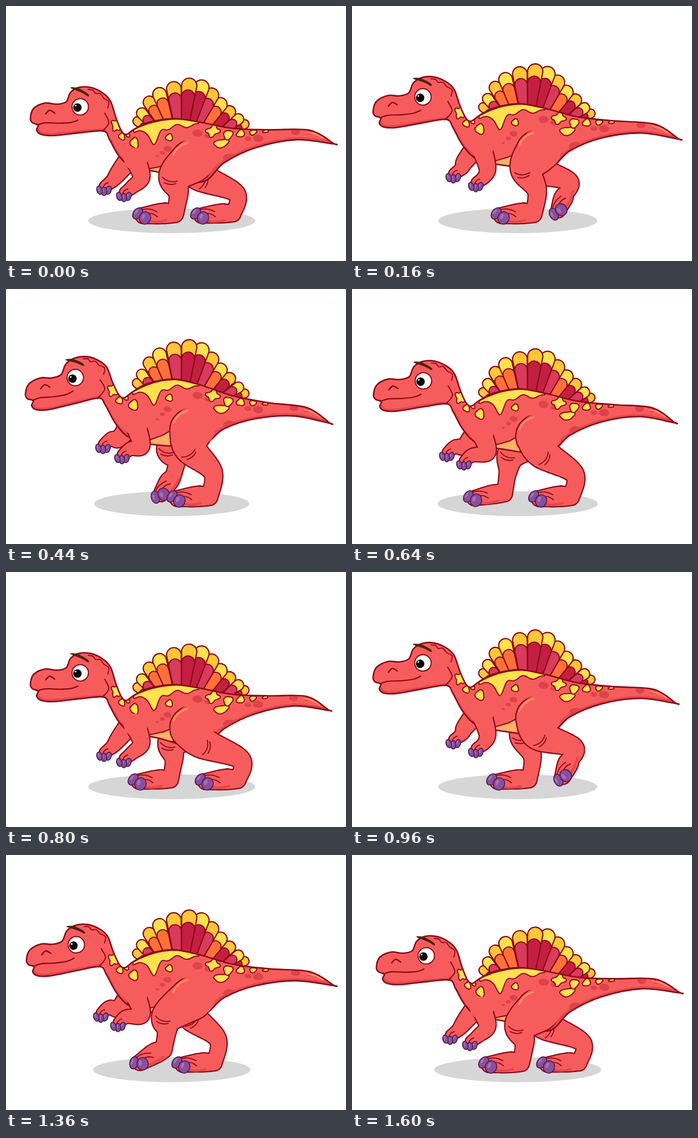
An HTML page with a canvas for the animation above (1.64 s loop, 600 by 450 pixels).

```html
<!DOCTYPE html>
<html lang="en">
<head>
<meta charset="utf-8">
<title>Walking dinosaur</title>
<style>
html, body { margin: 0; width: 100%; height: 100%; overflow: hidden; background: #fff; }
canvas { display: block; }
</style>
</head>
<body>
<canvas id="stage" width="600" height="450"></canvas>
<script>
const ctx = document.getElementById('stage').getContext('2d');
const RED = '#f75c5c', SHADE = '#e2484d', SPOT = '#dd434b', LINE = '#8a0a18', GLOW = '#ff9468';
const YELLOW = '#ffe14f', AMBER = '#ffc737', CLAW = '#8a4f9c';
const PINK = '#d83b5c', CRIMSON = '#c41f40', ORANGE = '#ff7139';
const CYCLE = 1600, HOLD = 40, TAU = Math.PI * 2;

// Side view at the top of a step; warp() bends it through the walk
const BODY = [34,186, 40,168, 60,157, 80,157, 97,151, 105,133, 120,122, 142,119, 164,126, 178,138, 188,164,
  199,186, 209,191, 224,180, 250,166, 295,158, 345,169, 400,188, 465,201, 535,211, 575,238, 575,239, 510,225,
  440,229, 385,246, 345,274, 270,275, 220,263, 194,238, 176,206, 164,192, 125,201, 75,213, 53,213, 45,206,
  48,197, 38,194];
const CREST = [[231, 165], [266, 118], [335, 103], [382, 146], [421, 184]];
const FEATHERS = [PINK, PINK, ORANGE, ORANGE, PINK, CRIMSON, CRIMSON, PINK, ORANGE, CRIMSON, PINK, CRIMSON];

let lift = 0, sink = 0, sway = 0;

const clamp = v => Math.max(0, Math.min(1, v));
const mix = (a, b, u) => a + (b - a) * u;
const bell = (x, mid, width) => Math.exp(-(((x - mid) / width) ** 2));

// Head, back and tail follow the bounce; both ends lag behind the middle
function warp(x, y) {
  const belly = x > 190 && x < 330 ? 1 - .55 * clamp((y - 215) / 60) : 1;
  const end = clamp((Math.abs(x - 280) - 60) / 120);
  const tip = clamp((x - 400) / 175) ** 2;
  return [
    x + sink * 9 * clamp((240 - x) / 80) - tip * (2 + 5 * Math.cos(sway - 2.7)),
    y + sink * (belly * (8 + 33 * bell(x, 280, 170)) - 18 * lift * end) + tip * (3 * Math.cos(sway - 1.7) - 5)
  ];
}

// Point on a Catmull-Rom curve; u counts control points
function along(pts, u) {
  const at = i => pts[Math.max(0, Math.min(pts.length - 1, i))];
  const i = Math.min(Math.floor(u), pts.length - 2), f = u - i;
  const [a, b, c, d] = [at(i - 1), at(i), at(i + 1), at(i + 2)];
  return b.map((v, k) => v + f / 2 * (c[k] - a[k]
    + f * (2 * a[k] - 5 * v + 4 * c[k] - d[k] + f * (3 * v - a[k] - 3 * c[k] + d[k]))));
}

function spline(flat, closed) {
  const pts = [];
  for (let i = 0; i < flat.length; i += 2) pts.push(warp(flat[i], flat[i + 1]));
  const n = pts.length, path = new Path2D();
  const at = i => closed ? pts[(i + n) % n] : pts[Math.max(0, Math.min(n - 1, i))];
  path.moveTo(...pts[0]);
  for (let i = 0; i < (closed ? n : n - 1); i++) {
    const [a, b, c, d] = [at(i - 1), at(i), at(i + 1), at(i + 2)];
    path.bezierCurveTo(b[0] + (c[0] - a[0]) / 6, b[1] + (c[1] - a[1]) / 6,
      c[0] - (d[0] - b[0]) / 6, c[1] - (d[1] - b[1]) / 6, c[0], c[1]);
  }
  if (closed) path.closePath();
  return path;
}

function paint(path, fill, stroke, width = 2) {
  if (fill) { ctx.fillStyle = fill; ctx.fill(path); }
  if (stroke) { ctx.strokeStyle = stroke; ctx.lineWidth = width; ctx.stroke(path); }
}

const line = (flat, color = LINE, width = 2) => paint(spline(flat), null, color, width);

function curve(x1, y1, cx, cy, x2, y2, color = LINE, width = 1.8) {
  paint(new Path2D(`M${x1} ${y1}Q${cx} ${cy} ${x2} ${y2}`), null, color, width);
}

function oval(x, y, rx, ry, turn, fill, stroke, width) {
  const path = new Path2D();
  path.ellipse(x, y, rx, ry, turn, 0, TAU);
  paint(path, fill, stroke, width);
}

const dot = (x, y, rx, ry, fill, stroke, width) => oval(...warp(x, y), rx, ry, .1, fill, stroke, width);

// Yellow patch with an uneven, lobed rim
function blotch(x, y, rx, ry, lobes = 3, depth = .12) {
  const rim = [];
  for (let a = 0; a < TAU - .01; a += TAU / 16) {
    const r = 1 + depth * Math.sin(lobes * a + x);
    rim.push(x + rx * r * Math.cos(a), y + ry * r * Math.sin(a));
  }
  paint(spline(rim, true), YELLOW, LINE);
}

// Shrinking row of darker spots
function spots(x, y, r, dx, dy, count) {
  for (let i = 0; i < count; i++) dot(x + dx * i, y + dy * i, r * .65 ** i, r * .7 * .65 ** i, SPOT);
}

// Rounded tapering limb through [x, y, radius] joints
function tube(path, joints) {
  for (let u = 0; u <= joints.length - 1; u += 1 / 24) {
    const [x, y, r] = along(joints, u);
    path.moveTo(x + r, y);
    path.arc(x, y, r, 0, TAU);
  }
}

function outlined(path) {
  paint(path, null, LINE, 4.4);
  paint(path, RED);
}

function claw(x, y, rx, ry, turn) {
  oval(x, y, rx, ry, turn, CLAW, '#4d1b4f', 1.6);
  oval(x - rx * .3, y - ry * .25, rx * .25, ry * .45, turn, '#a873b5');
}

// phase 0 is touchdown: the foot slides back flat, then peels off and swings forward
function leg(phase, shift, size, body) {
  const stance = .68, p = phase % 1;
  const stride = p < stance ? p / stance : (1 + Math.cos(Math.PI * (p - stance) / (1 - stance))) / 2;
  const tilt = Math.sin(Math.PI * clamp((p - .6) / .4) ** .7);
  const reach = 57 - 30 * tilt, angle = 1.25 * tilt;

  const toe = [shift + 222 + 150 * stride, 370 - 10 * tilt, 13 * size];
  const heel = [toe[0] + reach * Math.cos(angle), toe[1] - 3 - reach * Math.sin(angle), 14 * size];
  const hock = [heel[0] + 6, heel[1] - 44 + 22 * tilt + 8 * sink, 16 * size];
  const hip = [327, 248 + 27 * sink, 37 * size];
  const knee = [327 + (toe[0] - 307) * .45 - 28 * tilt, hip[1] + 32 - 6 * sink, 27 * size];
  const instep = [mix(heel[0], toe[0], .35), mix(heel[1], toe[1], .35) - 2, 17 * size];

  const path = new Path2D();
  tube(path, [hip, knee, hock, heel]);
  tube(path, [heel, instep, toe]);
  outlined(path);

  if (body) {
    // The thigh merges into the flank at its upper rear
    ctx.save();
    ctx.clip(body);
    oval(hip[0] + 5, hip[1] - 4, 37, 37, 0, RED);
    ctx.restore();
    const glow = new Path2D();
    glow.arc(hip[0], hip[1], hip[2] - 3, 3.5, 4.5);
    paint(glow, null, GLOW, 3);
  }

  ctx.save();
  ctx.translate(knee[0], knee[1]);
  ctx.rotate(Math.atan2(knee[1] - hip[1], knee[0] - hip[0]) - TAU / 3);
  curve(-20, 8, -6, 15, 7, 6);
  curve(-14, 16, -2, 18, 6, 11);
  ctx.restore();

  ctx.save();
  ctx.translate(toe[0], toe[1]);
  ctx.rotate(-angle);
  curve(14, 10, 28, 12, 42, 8, SHADE, 4);
  curve(-3, -10, 10, -15, 25, -7);
  curve(8, -3, 17, -6, 26, 2);
  claw(-9, -4, 7.5, 11, .65);
  claw(4, 4, 10, 11, .4);
  ctx.restore();
}

function arm(shoulder, elbow, [x, y]) {
  const path = new Path2D();
  tube(path, [[...shoulder, 17], [...elbow, 14], [x + 13, y - 10, 11], [x, y, 9]]);
  outlined(path);
  curve(x - 4, y + 2, x - 1, y - 5, x + 5, y - 6);
  for (let i = 1; i >= -1; i--) claw(x - 2 + 8 * i, y + 9 - 2 * i * i, 4.7, 7.5, .3 * i);
}

// Wedges fanned along the crest, outermost first so the middle ends on top
function sail() {
  const wedge = (x, y, r, bx, by) => {
    const turn = Math.atan2(y - by, x - bx), path = new Path2D();
    path.moveTo(bx, by);
    path.arc(x, y, r, turn - Math.PI / 2, turn + Math.PI / 2);
    path.closePath();
    return path;
  };
  const last = FEATHERS.length - 1;
  const order = [...FEATHERS.keys()].sort((a, b) => Math.abs(b - 4.6) - Math.abs(a - 4.6));
  for (const i of order) {
    const [x, y] = along(CREST, i / last * (CREST.length - 1));
    const r = 8 + 5.5 * Math.sin(Math.PI * i / last);
    const rear = Math.max(0, x - 365);
    const [tx, ty] = warp(x, y), [bx, by] = warp(310 + rear * .6, 240 - rear * .45);
    const k = .855;
    paint(wedge(tx, ty, r, bx, by), i < 5 === (i % 2 > 0) ? YELLOW : AMBER, LINE, 2.2);
    paint(wedge(mix(bx, tx, k), mix(by, ty, k), r * k, bx, by), FEATHERS[i], LINE, 2);
  }
}

// Yellow saddle hanging from the back line, with one long drip
function saddle() {
  const top = [], fringe = [];
  for (let x = 224; x <= 340; x += 4) {
    const back = 159 + (x - 297) ** 2 / 245;
    const depth = 14 + 4 * Math.sin(x / 5.5) + 30 * bell(x, 262, 9);
    top.push(x, back);
    fringe.unshift(x, back + depth * Math.sin(Math.PI * (x - 222) / 120) ** .4);
  }
  paint(spline([...top, ...fringe], true), YELLOW, LINE);
}

function markings() {
  spots(338, 187, 9, 18, 7, 2);
  spots(285, 211, 7, -9, 9, 3);
  spots(445, 213, 9, -18, -2, 2);
  spots(510, 211, 8, 24, 4, 2);
  spots(395, 240, 12, 0, 0, 1);
  saddle();
  blotch(188, 178, 8, 10, 4, .25);
  blotch(200, 196, 6, 6);
  blotch(212, 192, 4, 3);
  blotch(225, 204, 8, 9);
  blotch(288, 191, 6, 6);
  blotch(365, 187, 11, 9, 4, .25);
  blotch(380, 211, 13, 7);
  for (let i = 0; i < 4; i++) blotch(392 + 22 * i, 198 + 1.5 * i, 8 - i, 8 - 1.8 * i);
}

function torso(body) {
  paint(body, RED);
  ctx.save();
  ctx.clip(body);
  line([575,239, 510,225, 440,229, 385,246, 345,274], SHADE, 9);
  line([164,192, 125,201, 75,213, 53,213, 45,206], SHADE, 9);
  line([176,206, 194,238, 220,263], SHADE, 6);
  paint(spline([246,269, 275,258, 297,249, 304,280, 250,276], true), '#ffb069', LINE);
  markings();
  line([530,214, 545,219, 558,227], GLOW, 2.5);
  ctx.restore();
  paint(body, null, LINE, 2.6);
}

function face() {
  line([46,197, 60,192, 85,190, 106,186, 118,180], LINE, 2.2);
  line([61,176, 68,169, 77,173], LINE, 2.4);
  line([161,193, 174,176, 166,160]);
  line([136,123, 144,123, 149,128, 157,127, 163,133], LINE, 1.8);
  line([164,134, 174,139, 172,150], LINE, 1.8);
  dot(122, 156, 14.5, 14.5, '#fff', LINE, 2);
  dot(117, 158, 7.5, 7.5, '#0c0808');
  dot(114, 155, 1.5, 1.5, '#fff');
  paint(spline([105,125, 118,124, 135,131, 136,135, 124,130], true), '#4b2310', '#4b2310', 1);
}

function draw(t) {
  const beat = t / CYCLE, step = beat * 2 % 1;
  lift = Math.sin(Math.PI * step ** .93);
  sink = 1 - lift;
  sway = TAU * beat;
  const swing = Math.sin(TAU * step), phase = beat + .0875;

  ctx.clearRect(0, 0, 600, 450);
  ctx.lineCap = ctx.lineJoin = 'round';
  oval(292.5, 379, 147.5 - 11 * lift, 22, 0, '#d6d6d6');

  const body = spline(BODY, true);
  arm([218, 240 + 30 * sink], [199, 264 + 30 * sink], [175 + 6 * swing, 275 + 43 * sink + 6 * swing]);
  leg(phase + .5, -8, .92);
  sail();
  torso(body);
  face();
  leg(phase, 0, 1, body);

  const shoulder = [229, 240 + 32 * sink];
  arm(shoulder, [239, 276 + 26 * sink], [210 + 11 * swing, 293 + 36 * sink + 6 * swing]);
  oval(shoulder[0], shoulder[1] - 2, 21, 20, 0, RED);
}

function frame(now) {
  const tick = Math.floor(now % (CYCLE + HOLD) / 40) * 40;
  draw(tick % CYCLE);
  requestAnimationFrame(frame);
}
requestAnimationFrame(frame);
</script>
</body>
</html>
```
